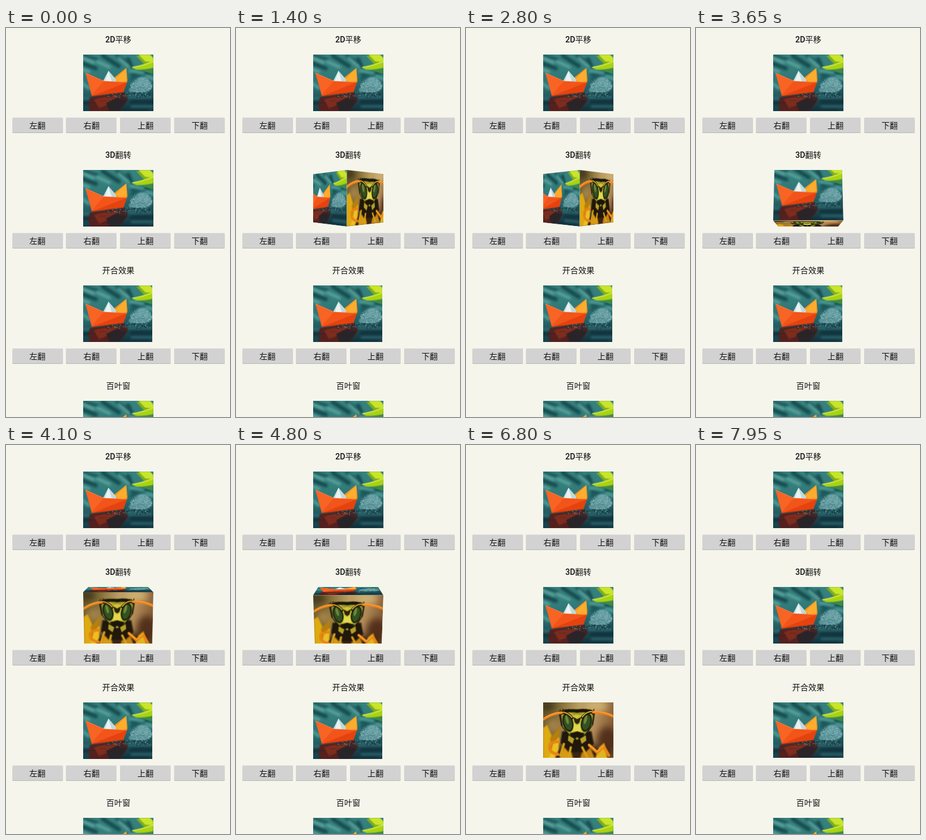
Write an HTML page with a canvas that moves like this. It is 389 by 674 pixels and loops after 8 s.

```html
<!DOCTYPE html>
<html lang="zh-CN">
<head>
<meta charset="utf-8">
<title>图片翻转效果</title>
<style>
html, body { margin: 0; width: 100%; height: 100%; overflow: hidden; background: #f5f5eb; }
#page { position: absolute; left: 0; top: 0; width: 389px; height: 674px; overflow: hidden; background: #f5f5eb;
  font: 500 14px/20px Roboto, "Noto Sans CJK SC", "Noto Sans CJK", sans-serif; color: #111; }
.row { position: absolute; left: 0; width: 389px; height: 200px; }
.title { position: absolute; top: 10px; left: 0; width: 390px; text-align: center; white-space: nowrap; }
.view { position: absolute; left: 134px; top: 46px; width: 122px; height: 98px; overflow: hidden; }
.view canvas { position: absolute; left: 0; }
.button { position: absolute; top: 155px; width: 88px; height: 27px; line-height: 28px; text-align: center;
  background: #d2d2d2; border-radius: 2px; box-shadow: inset 0 1px #dcdcda, inset 0 -1px #b8b8b6; }
.button.pressed { background: #8fcbe2; box-shadow: inset 0 0 0 1px #62bbdd, 0 0 0 3px #b9dfe8; }
</style>
</head>
<body>
<div id="page"></div>
<script>
const W = 122, H = 98, DENSITY = 2, LOOP = 8000, TICK = 50;
const DURATION = 760, PRESS = 100, DEPTH = 420;
const TITLES = ['2D平移', '3D翻转', '开合效果', '百叶窗'];
const BUTTONS = ['左翻', '右翻', '上翻', '下翻'];

// way is the index of the pressed button; lag is when the roll begins after the press
const MOVES = [
  { at: 1000, row: 1, way: 0, lag: 10 },
  { at: 2400, row: 1, way: 1, lag: 10 },
  { at: 3500, row: 1, way: 2, lag: -12 },
  { at: 4600, row: 1, way: 3, lag: 10 },
  { at: 6050, row: 2, way: 0, lag: -12 },
  { at: 7150, row: 2, way: 1, lag: 10 }
];

function seeded(seed) {
  return () => (seed = (seed * 16807) % 2147483647) / 2147483647;
}

function makeCanvas(w, h) {
  const canvas = document.createElement('canvas');
  canvas.width = w * DENSITY;
  canvas.height = h * DENSITY;
  canvas.style.width = w + 'px';
  canvas.style.height = h + 'px';
  return canvas;
}

function picture(paint) {
  const canvas = makeCanvas(W, H), g = canvas.getContext('2d');
  g.scale(DENSITY, DENSITY);
  g.lineCap = g.lineJoin = 'round';
  paint({
    blur(radius) { g.filter = radius ? `blur(${radius * DENSITY}px)` : 'none'; },
    fill(color, path) { g.fillStyle = color; g.fill(new Path2D(path)); },
    line(color, width, path) { g.strokeStyle = color; g.lineWidth = width; g.stroke(new Path2D(path)); },
    oval(color, x, y, rx, ry, turn = 0) {
      g.fillStyle = color;
      g.beginPath();
      g.ellipse(x, y, rx, ry, turn, 0, 7);
      g.fill();
    },
    wash(x, y, ...colors) {
      const shade = g.createLinearGradient(0, 0, x, y);
      colors.forEach((c, i) => shade.addColorStop(i / (colors.length - 1), c));
      g.fillStyle = shade;
      g.fillRect(0, 0, W, H);
    }
  });
  return canvas;
}

function paintBoat({ blur, fill, line, oval, wash }) {
  const rnd = seeded(41);
  wash(12, H, '#3a8480', '#35807d', '#2f7577', '#22595f', '#173d47');
  blur(2);
  line('#164a4f', 7, 'M-4 14 L22 24 M34 2 L62 20 M78 8 L84 22 M86 34 L122 30');
  line('#1b5358', 5, 'M2 2 L24 8 M58 2 L78 14 M84 42 L96 34');
  line('#62a9a1', 4, 'M0 6 L18 14 M24 12 L46 22 M62 6 L80 22 M0 26 L10 30');
  line('#4c9b95', 6, 'M-2 50 L10 58 M82 28 L104 32 M110 38 L122 42');
  line('#12343e', 7, 'M84 82 H122 M60 96 H110 M0 84 H12');
  line('#347279', 3, 'M78 74 H118 M84 90 H122 M0 76 H10');
  // far green boat
  blur(0.7);
  fill('#3f8a4a', 'M98 26 L122 23 V34 L112 31Z');
  fill('#7fae1c', 'M92 2 L106 2 L122 8 V18 L106 17Z');
  fill('#c9e52a', 'M96 0 H116 L122 6 V13 L108 12Z');
  fill('#a9d310', 'M84 22 Q100 20 122 11 V23 Q104 27 92 26Z');
  line('#e0ee5c', 1.5, 'M86 22 Q102 20 122 12');
  // reflection
  blur(0.8);
  fill('#54211f', 'M12 74 L72 66 L78 78 L70 90 L62 99 H12 L9 86Z');
  fill('#7e2c1d', 'M18 77 L64 69 L50 83 L28 94Z');
  fill('#2a2428', 'M40 84 L56 76 L76 80 L62 99 H46Z');
  blur(0);
  for (let i = 0; i < 16; i++) {
    const x = 8 + rnd() * 62, y = 74 + rnd() * 24;
    line('#152f3899', 0.8, `M${x} ${y} h${4 + rnd() * 10}`);
  }
  // foam and its trail
  blur(1);
  oval('#5f999d', 102, 55, 18, 10);
  oval('#6aa2a6', 103, 47, 11, 8);
  oval('#5a9398', 90, 60, 11, 6, -0.2);
  blur(0);
  for (let i = 0; i < 320; i++) {
    const a = rnd() * 6.283, r = Math.sqrt(rnd());
    oval(['#8fbabd', '#4a838a', '#73a8ac'][i % 3], 101 + Math.cos(a) * r * 19, 54 + Math.sin(a) * r * 13, 0.7, 0.6);
  }
  for (let i = 0; i < 150; i++) {
    const x = 40 + rnd() * 76;
    oval(i % 3 ? '#14363f' : '#5c8f92', x, 70 + (rnd() - 0.5) * 9, 1, 0.6);
  }
  // near orange boat
  fill('#f2961c', 'M50 43 L75 23 L77 45 L74 52 L48 50Z');
  fill('#fdac2e', 'M56 42 L75 24 L75 46 L62 48Z');
  fill('#bfd9dc', 'M44 28 L34 47 L58 49 L57 43Z');
  fill('#e9f3f2', 'M44 28 L37 48 H50Z');
  fill('#f2541a', 'M4 32 L36 46 L76 48 L70 65 L15 72Z');
  fill('#e4430f', 'M15 72 L76 48 L70 65Z');
  fill('#f76424', 'M4 32 L36 46 L15 70Z');
  line('#ff8743', 0.8, 'M4 32 L36 46 L76 48');
  line('#b4330f', 0.9, 'M15 72 L70 65');
}

function paintBee({ blur, fill, line, oval, wash }) {
  const rnd = seeded(77);
  wash(W, 24, '#66572a', '#86703a', '#bb9f62', '#b48f5b', '#8a6038');
  blur(6);
  oval('#d0b273', 92, 6, 20, 9);
  oval('#43391c', 6, 6, 16, 9);
  oval('#a9854c', 18, 40, 12, 10);
  oval('#52301b', 112, 66, 18, 24);
  oval('#3c2412', 60, 90, 60, 18);
  // petals
  blur(1);
  fill('#dfa910', 'M0 44 L7 39 L15 58 L13 98 H0Z');
  fill('#b97f0c', 'M12 62 L30 42 L27 62 L16 84Z');
  fill('#ecc020', 'M9 98 L17 72 L28 60 L27 82 L20 98Z');
  fill('#d99a12', 'M28 98 L36 78 L46 74 L52 98Z');
  fill('#c78613', 'M64 98 L70 78 L80 74 L90 98Z');
  fill('#e0b41c', 'M90 98 L97 78 L106 70 L112 98Z');
  // body and legs
  fill('#21170b', 'M33 50 L84 50 L88 72 L74 86 L44 86 L30 70Z');
  blur(0.4);
  line('#e88414', 5, 'M26 90 Q12 88 11 78 T27 68');
  line('#e88414', 5, 'M80 74 L94 87 L105 76 L114 92');
  line('#ffb12f', 1.5, 'M79 73 L94 85 L105 75');
  line('#d6a01c', 4, 'M36 72 L30 92 M48 78 L44 96 M68 78 L76 94');
  // head
  fill('#1f1a0c', 'M27 18 Q36 10 59 12 Q82 9 90 18 L87 38 L74 58 L59 69 L44 58 L31 40Z');
  fill('#9b962a', 'M31 22 Q45 14 59 18 Q74 14 87 22 L84 40 L72 56 L59 65 L46 56 L34 42Z');
  fill('#d0c437', 'M50 24 Q59 18 68 24 L65 40 L70 50 L59 58 L48 50 L53 40Z');
  fill('#e2d94e', 'M54 37 L59 40 L64 37 L66 48 L59 52 L52 48Z');
  for (const [x, turn] of [[43, -0.25], [75, 0.25]]) {
    oval('#14190b', x, 35, 9, 16, turn);
    oval('#34501f', x, 35, 7, 13.5, turn);
    oval('#6f8a3c', x - 1.5, 30, 2.5, 8, turn);
  }
  line('#c9bb34', 2, 'M34 20 Q43 15 52 22 M66 22 Q75 15 84 20');
  fill('#2a2410', 'M52 25 L59 29 L66 25 L63 35 L59 38 L55 35Z');
  fill('#1c160a', 'M46 54 L59 50 L72 54 L66 66 L59 60 L52 66Z');
  fill('#b3a02a', 'M44 57 L54 63 L51 72 L43 66Z');
  fill('#b3a02a', 'M74 57 L64 63 L67 72 L75 66Z');
  blur(0);
  for (let i = 0; i < 50; i++) {
    const x = 29 + i * 1.2;
    line('#1b160d', 0.7, `M${x} 17 l${rnd() * 4 - 2} ${-2 - rnd() * 4}`);
  }
  // antennae
  line('#2a1d0d', 5, 'M50 27 Q42 17 33 18 M68 26 Q76 16 86 17');
  line('#cfae28', 2, 'M50 26 Q42 17 33 17 M68 25 Q76 15 86 16');
  line('#ee8118', 4.5, 'M32 18 Q16 19 1 29 M87 17 Q106 17 121 24');
  line('#ffaa42', 1.3, 'M31 17 Q16 18 2 27 M88 16 Q106 16 120 22');
}

function crop(source, y, w, h) {
  const canvas = makeCanvas(w, h);
  canvas.getContext('2d').drawImage(source, 0, -y * DENSITY);
  canvas.style.top = y + 'px';
  return canvas;
}

function addDiv(parent, className, text = '') {
  const div = document.createElement('div');
  div.className = className;
  div.textContent = text;
  return parent.appendChild(div);
}

const boat = picture(paintBoat), bee = picture(paintBee);
const rows = TITLES.map((title, i) => {
  const row = addDiv(document.getElementById('page'), 'row');
  row.style.top = i * 200 + 'px';
  addDiv(row, 'title', title);
  const view = addDiv(row, 'view');
  const buttons = BUTTONS.map((label, k) => {
    const button = addDiv(row, 'button', label);
    button.style.left = 10.5 + k * 93.9 + 'px';
    return button;
  });
  return { view, buttons };
});

function addFaces(view, parts, height) {
  return [boat, bee].map(source => Array.from({ length: parts },
    (_, i) => view.appendChild(crop(source, i * height, W, height))));
}

for (const i of [0, 3]) rows[i].view.append(crop(boat, 0, W, H));
rows[1].faces = addFaces(rows[1].view, 1, H);
rows[2].faces = addFaces(rows[2].view, 3, 32);
const narrow = rows[2].view.appendChild(crop(boat, 0, 120, H));

// turn 0 faces the viewer; side is -1 for the left or top face, 1 for the right or bottom one
function poseFace(face, side, turn, vertical) {
  const [shiftAxis, spinAxis, size] = vertical ? ['Y', 'X', H] : ['X', 'Y', W];
  const angle = 90 * turn * side * (vertical ? -1 : 1);
  const edge = side > 0 ? '0%' : '100%';
  for (const { style } of face) {
    style.visibility = turn > 0.998 ? 'hidden' : 'visible';
    style.transformOrigin = vertical ? `50% ${edge}` : `${edge} 50%`;
    style.transform = turn < 0.001 ? 'none'
      : `translate${shiftAxis}(${side * turn * size}px) perspective(${DEPTH}px) rotate${spinAxis}(${angle}deg)`;
  }
}

function progress(move, time) {
  const t = Math.min(1, Math.max(0, (time - move.at - move.lag) / DURATION));
  const eased = 0.5 - Math.cos(Math.PI * t) / 2;
  return move.way % 2 ? 1 - eased : eased;
}

function render(time) {
  for (const i of [1, 2]) {
    const { faces, buttons } = rows[i];
    const move = MOVES.filter(m => m.row === i && m.at <= time).pop();
    const p = move ? progress(move, time) : 0;
    const vertical = !!move && move.way > 1;
    poseFace(faces[0], -1, p, vertical);
    poseFace(faces[1], 1, 1 - p, vertical);
    buttons.forEach((button, k) => button.classList.toggle('pressed',
      !!move && move.way === k && time - move.at < PRESS));
    if (i === 2) {
      narrow.style.display = move ? 'none' : 'block';
      if (!move) faces[0].forEach(strip => strip.style.visibility = 'hidden');
    }
  }
}

const start = performance.now();
function frame() {
  const time = (performance.now() - start) % LOOP;
  render(Math.floor(time / TICK) * TICK);
  requestAnimationFrame(frame);
}
frame();
</script>
</body>
</html>
```
